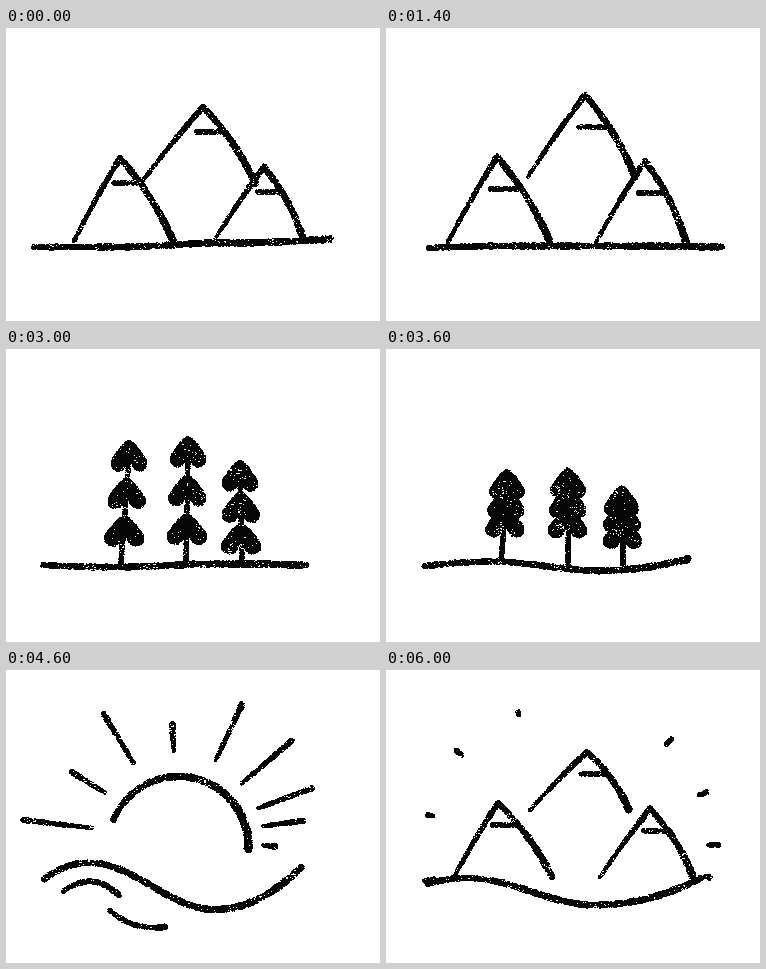
These frames come from a looping animation (374x293 px, 6.2 s). An HTML page with a canvas:

```html
<!DOCTYPE html>
<html lang="en">
<head>
<meta charset="utf-8">
<title>Charcoal landscape</title>
<style>
html, body { margin: 0; width: 100%; height: 100%; overflow: hidden; background: #fff; }
canvas { display: block; }
</style>
</head>
<body>
<canvas width="374" height="293"></canvas>
<script>
const ctx = document.querySelector('canvas').getContext('2d');
const STEP = 200, COUNT = 31;
const clamp = v => Math.max(0, Math.min(1, v));
const mix = (a, b, t) => a + (b - a) * t;

let step = -1, shake = 0, strokes = 0;

// Repeatable random number that is redrawn on every step.
function hash(a, b, c = 0) {
  let h = Math.imul(a, 374761393) ^ Math.imul(b, 668265263) ^ Math.imul(c + step * 31, 1274126177);
  h = Math.imul(h ^ h >>> 13, 1103515245);
  h = Math.imul(h ^ h >>> 15, 2246822519);
  return ((h ^ h >>> 16) >>> 0) / 4294967296;
}

// Chalky paper: fine grain with a few drier patches.
function grain(x, y) {
  const patch = Math.max(0, Math.sin(x * .11 + step * 2) * Math.sin(y * .17 + step));
  return .6 * hash(x >> 1, y) + .4 * hash(x, y, 5) - .16 * patch;
}
const wobble = id => (hash(id, 1, 2) - .5) * shake;

function brush(path, length, w0, w1 = w0) {
  const id = ++strokes, ox = wobble(id), oy = wobble(id + 500);
  for (let s = 0; s <= length; s++) {
    const u = s / length, [px, py] = path(u), cx = px + ox, cy = py + oy;
    const w = mix(w0, w1, u), r = w / 2 * (.9 + .25 * hash(s >> 2, id, 9));
    const dry = .1 + Math.max(0, 5 - w) * .1;
    for (let y = Math.floor(cy - r); y <= cy + r; y++) {
      for (let x = Math.floor(cx - r); x <= cx + r; x++) {
        const d = Math.hypot(x + .5 - cx, y + .5 - cy) / r;
        if (d < 1 && grain(x, y) > dry + .35 * d ** 6) ctx.fillRect(x, y, 1, 1);
      }
    }
  }
}

// Line from one point to another, bowed to the left of its direction.
function line(x0, y0, x1, y1, w0, w1 = w0, bow = 0) {
  const dx = x1 - x0, dy = y1 - y0, len = Math.hypot(dx, dy);
  if (len < 2) return;
  brush(u => {
    const b = bow * 4 * u * (1 - u) / len;
    return [x0 + dx * u + dy * b, y0 + dy * u - dx * b];
  }, len, w0, w1);
}

// Ground runs from its start over a crest, through a trough, to its end.
function ground([x0, y0, cx, cy, tx, ty, x1, y1]) {
  brush(u => {
    const x = mix(x0, x1, u);
    if (x < cx) return [x, mix(cy, y0, ((cx - x) / (cx - x0)) ** 2)];
    if (x > tx) return [x, mix(ty, y1, ((x - tx) / (x1 - tx)) ** 2)];
    return [x, mix(cy, ty, .5 - .5 * Math.cos(Math.PI * (x - cx) / (tx - cx)))];
  }, x1 - x0, 6.5, 7.5);
}

function mountains([drop, base, middle, ...peaks]) {
  for (let i = 0; i < 3; i++) {
    const [x, y, left, right] = peaks.slice(i * 4), foot = i === 1 ? middle : base;
    line(left, foot, x, y, 4.5, 6.5, 1);
    line(x, y, right, foot, 6.5, 7.5, 4);
    line(x - 6, y + drop, mix(x, right, drop / (foot - y)) + 4, y + drop, 5.5);
  }
}

function tier(cx, top, w, h) {
  for (let y = Math.floor(top); y <= top + h; y++) {
    for (let x = Math.floor(cx - w / 2); x <= cx + w / 2; x++) {
      const u = Math.abs(x + .5 - cx) / (w / 2), v = (y + .5 - top) / h;
      const roof = .62 * u ** 1.5;
      const lobe = .74 + .26 * Math.sqrt(Math.max(0, 1 - ((u - .58) / .45) ** 2));
      const g = grain(x, y);
      if (u <= 1 && Math.min(v - roof, lobe - v) > g * .05 && g > .1) ctx.fillRect(x, y, 1, 1);
    }
  }
}

// Three tiers hang along each trunk; with no spacing they merge into one.
function forest([spacing, size, ...trunks]) {
  for (let i = 0; i < 3; i++) {
    const [x, y, footX, footY] = trunks.slice(i * 4);
    line(x, y + size / 2, footX, footY, 5, 6);
    for (let k = 0; k < 3; k++) {
      const t = k * spacing;
      tier(mix(x, footX, t), mix(y, footY, t), size + 2 * k - 1, size * .9);
    }
  }
}

const RAY_ANGLES = [184, 210, 238, 267, 296, 321, 342, 355, 369];
const RAY_LENGTHS = [68, 39, 57, 26, 60, 64, 76, 40, 15];

function sun([cx, cy, start, end, inner, stretch, spread, gap]) {
  const polar = (deg, r, y) => {
    const a = deg * Math.PI / 180;
    return [cx + r * Math.cos(a), y + r * Math.sin(a)];
  };
  if (end > start) brush(u => polar(mix(start, end, u), 70, cy), (end - start) * 1.22, 6.5, 8.5);
  RAY_ANGLES.forEach((deg, i) => {
    const late = i > 5 && i % 2 === 0;
    const reach = RAY_LENGTHS[i] * stretch * (late ? clamp((spread - .88) / .12) : 1);
    if (reach < 2.5) return;
    const angle = 267 + (deg - 267) * spread + (i < 4 ? -gap : gap);
    line(...polar(angle, inner + reach, cy - 10), ...polar(angle, inner, cy - 10), 6.5, 4.7);
  });
}

const wave = ([x0, y0, x1, y1, bow]) => line(x0, y0, x1, y1, 5.5, 6.5, bow);

// Key poses
const tall = [32, 214, 149, 111, 129, 62, 164, 199, 67, 142, 249, 259, 133, 210, 300];
const soft = [22, 207, 140, 112, 133, 68, 166, 201, 82, 144, 243, 264, 139, 214, 307];
const grove = [.3, 37, 123, 90, 115, 215, 182, 86, 180, 215, 234, 110, 236, 215];
const saplings = [0, 34, 117, 177, 117, 210, 182, 181, 183, 222, 239, 187, 240, 222];
const valley = [38, 205, 76, 186, 208, 243, 293, 193];
const crestWave = [52, 220, 113, 225, 14], troughWave = [104, 241, 177, 263, -9];

// Each layer moves between [step, pose] keys and is hidden outside them.
const layers = [
  [ground,
    [0, [28, 219, 115, 219, 215, 215, 325, 211]],
    [7, [43, 220, 120, 218, 220, 218, 336, 219]],
    [11, [33, 220, 115, 213, 215, 213, 312, 211]],
    [15, [37, 216, 110, 218, 210, 215, 300, 216]],
    [20, [37, 217, 100, 208, 212, 225, 301, 205]],
    [24, valley], [27, valley],
    [30, [42, 214, 80, 208, 210, 235, 315, 208]]],
  [mountains,
    [0, [25, 213, 155, 114, 130, 68, 167, 197, 79, 135, 249, 258, 139, 208, 298]],
    [7, tall], [9, tall]],
  [mountains, [29, soft], [30, soft]],
  [forest,
    [10, saplings],
    [11, [.305, 39, 122, 91, 116, 213, 183, 78, 182, 213, 235, 104, 236, 213]],
    [15, grove], [17, grove], [20, saplings], [21, saplings]],
  [sun,
    [19, [176, 225, 240, 318, 84, .6, .88, 0]],
    [20, [176, 213, 222, 336, 84, .92, .88, 0]],
    [24, [171, 166, 196, 371, 86, 1.05, 1, 0]],
    [27, [171, 187, 196, 371, 86, 1, 1, 0]],
    [30, [183, 185, 316, 216, 139, .13, 1, 18]]],
  [wave, [20, [77, 225, 116, 227, 5]], [24, crestWave], [28, crestWave]],
  [wave, [20, [104, 241, 104, 241, 0]], [24, troughWave], [28, troughWave]]
];

function paint() {
  ctx.fillStyle = '#fff';
  ctx.fillRect(0, 0, 374, 293);
  ctx.fillStyle = '#050505';
  strokes = 0;
  for (const [draw, ...keys] of layers) {
    const next = keys.findIndex(k => k[0] >= step);
    if (next < 0 || step < keys[0][0]) continue;
    const [n1, to] = keys[next], [n0, from] = keys[Math.max(0, next - 1)];
    const t = n1 === step ? 1 : (step - n0) / (n1 - n0);
    shake = n1 === step ? 0 : 3;
    draw(to.map((v, i) => mix(from[i], v, t)));
  }
}

function tick() {
  const now = Math.floor(performance.now() / STEP) % COUNT;
  if (now !== step) {
    step = now;
    paint();
  }
  requestAnimationFrame(tick);
}
tick();
</script>
</body>
</html>
```
